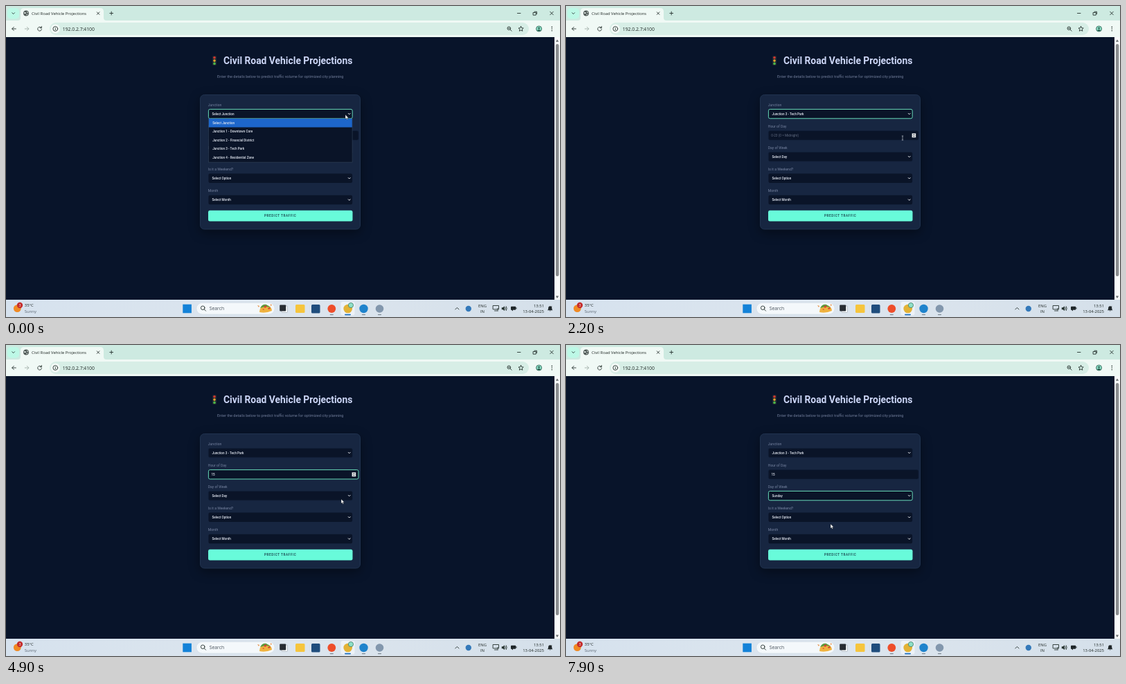
These frames come from a looping animation (800x450 px, 8000 ms). An HTML page:

```html
<!DOCTYPE html>
<html lang="en">
<head>
<meta charset="utf-8">
<title>Traffic form</title>
<style>
html, body { margin: 0; width: 100%; height: 100%; overflow: hidden; background: #08142a; }
svg { display: block; width: 100vw; height: 100vh; }
text { font-family: Roboto, "Open Sans", sans-serif; white-space: pre; }
.ui text { font-family: "Open Sans", "Noto Sans", sans-serif; fill: #1d2623; }
.line { fill: none; stroke: #26332f; stroke-width: .9; stroke-linecap: round; stroke-linejoin: round; }
.label { font-size: 5.05px; fill: #7784a1; }
.value { font-size: 4.6px; fill: #e3e8f2; font-weight: 500; }
.hint { font-size: 4.75px; fill: #616b80; }
.card { filter: drop-shadow(0 5px 8px rgba(0, 0, 0, .38)); }
</style>
</head>
<body>
<svg id="stage" viewBox="0 0 800 450">
  <defs>
    <linearGradient id="bar"><stop offset="0" stop-color="#d6e2ee"/><stop offset=".5" stop-color="#dce5ee"/><stop offset="1" stop-color="#d5e0ea"/></linearGradient>
  </defs>
  <rect width="800" height="450" fill="#08142a"/>

  <!-- browser chrome -->
  <g class="ui">
    <rect width="800" height="45" fill="#cdeae1"/>
    <rect x="2" y="3" width="17" height="15.5" rx="5" fill="#bdf8e6"/>
    <path class="line" d="M8.8 9.8l1.8 1.8 1.8-1.8"/>
    <path d="M17 21q4 0 4-4V8q0-5 5-5H136q5 0 5 5v9q0 4 4 4H800V45H0V21Z" fill="#f0f9f5"/>
    <circle cx="29" cy="10.5" r="3.9" fill="#4d5754"/>
    <path d="M26.5 8.5l2.3 1-.8 2-1.6-.6zM30 7.6l2 1.6-1.4 1zM29.4 11.4l2 .4-1.6 2z" fill="#e9f3ef"/>
    <text x="37" y="12.8" font-size="5.85">Civil Road Vehicle Projections</text>
    <path class="line" d="M131.3 8.8l3.6 3.6m0-3.6l-3.6 3.6M149.8 10.5h4.8m-2.4-2.4v4.8"/>
    <path class="line" d="M738.5 10.5h4.5M761.5 9.5h3.7v3.7h-3.7zM763 8.2h3.5v3.5M785.7 8.2l4.6 4.6m0-4.6l-4.6 4.6" stroke-width=".7"/>
    <path class="line" d="M14.3 33H8.8m2.5-2.6L8.7 33l2.6 2.6"/>
    <path class="line" d="M27.3 33h5.5m-2.5-2.6l2.6 2.6-2.6 2.6" style="stroke:#a3afaa"/>
    <path class="line" d="M51 31.5a2.9 2.9 0 1 0 .5 2.2M51.4 29.6v2.2h-2.2"/>
    <rect x="63" y="24" width="692" height="18" rx="9" fill="#d7eee6"/>
    <circle cx="71.3" cy="33" r="6.6" fill="#f3faf7"/>
    <circle class="line" cx="71.3" cy="33" r="3.4" stroke-width=".8"/>
    <path class="line" d="M71.3 32.8v1.8M71.3 31.3v.1"/>
    <text x="81.8" y="35.6" font-size="6.8">192.0.2.7:4100</text>
    <circle class="line" cx="726.3" cy="32.3" r="2.3"/>
    <path class="line" d="M728.1 34.1l2.1 2.1M725.3 32.3h2"/>
    <path id="star" class="line"/>
    <circle cx="769.6" cy="33" r="4" fill="#8ddfc7" stroke="#27594b" stroke-width=".8"/>
    <circle cx="769.6" cy="32" r="1.3" fill="#27594b"/>
    <path d="M767.2 35.4q2.4-2.6 4.8 0-2.4 1.8-4.8 0z" fill="#27594b"/>
    <path class="line" d="M788.3 30.3v.1m0 2.6v.1m0 2.6v.1" style="stroke-width:1.5"/>
  </g>

  <!-- page scrollbar -->
  <rect x="792" y="45" width="8" height="380" fill="#f9fafa"/>
  <rect x="793.8" y="55" width="4.6" height="336" rx="2.3" fill="#8b8d8f"/>
  <path d="M793.8 51.8l2.2-3.4 2.2 3.4zM793.8 419.6l2.2 3.4 2.2-3.4z" fill="#6d7073"/>

  <!-- page -->
  <rect x="298" y="72" width="6" height="14" rx="1.6" fill="#202832"/>
  <circle cx="301" cy="74.7" r="1.8" fill="#d5382f"/>
  <circle cx="301" cy="79.1" r="1.8" fill="#e5a52c"/>
  <circle cx="301" cy="83.4" r="1.8" fill="#4cb84a"/>
  <text x="314" y="84" font-size="13.85" font-weight="700" fill="#ccd6f6">Civil Road Vehicle Projections</text>
  <text x="396.2" y="103.6" font-size="5.55" fill="#717d9a" text-anchor="middle">Enter the details below to predict traffic volume for optimized city planning</text>
  <rect class="card" x="280.5" y="128.5" width="231" height="194.5" rx="6" fill="#172641" stroke="#20334f"/>
  <g id="form"></g>
  <rect x="292" y="295.8" width="208.5" height="15.6" rx="2.5" fill="#68fbda"/>
  <text x="373" y="305.3" font-size="4.6" font-weight="500" letter-spacing=".6" fill="#153a45">PREDICT TRAFFIC</text>
  <g id="menus"></g>

  <!-- taskbar -->
  <g class="ui">
    <rect y="425" width="800" height="25" fill="url(#bar)"/>
    <circle cx="16.3" cy="437.6" r="5.4" fill="#f08a24"/>
    <circle cx="20" cy="433" r="4.2" fill="#c42b2b"/>
    <text x="20" y="435" font-size="5.4" text-anchor="middle" style="fill:#fff">3</text>
    <text x="26.8" y="435.3" font-size="5.9">35°C</text>
    <text x="26.8" y="443.8" font-size="5.9" style="fill:#596470">Sunny</text>
    <rect x="255.3" y="431.7" width="12.6" height="12.6" fill="#1382d8"/>
    <rect x="275" y="429.5" width="113" height="16.5" rx="8.2" fill="#f4f8fb" stroke="#cfd9e2" stroke-width=".5"/>
    <circle class="line" cx="284.2" cy="436.8" r="2.8"/>
    <path class="line" d="M286.3 438.9l2.2 2.3"/>
    <text x="293.8" y="440" font-size="6.75" style="fill:#47515b">Search</text>
    <path d="M366 443q0-9 9-10 8 0 9 8-9 4-18 2z" fill="#efb23f"/>
    <path d="M367 437q3-6 9-5l6 4-7-1z" fill="#5c9e3f"/>
    <path d="M372 435l3-2 2 2-3 2zM378 437l3-1 1 2-3 1zM370 439l2-1 1 2z" fill="#d34832"/>
    <path d="M363 433l3 1-1 2zM382 431l2 2-2 1z" fill="#e78f45"/>
    <rect x="398" y="434" width="8.5" height="9.5" rx="1" fill="#f7f9fb" stroke="#8b96a0" stroke-width=".5"/>
    <rect x="395.2" y="432.5" width="9" height="9" rx="1" fill="#272c32"/>
    <rect x="418" y="432" width="13.5" height="12" rx="1.5" fill="#f6c53d"/>
    <rect x="441" y="432" width="12.5" height="12.5" rx="1.5" fill="#1f4d7d"/>
    <circle cx="470.3" cy="438" r="5.9" fill="#ee4e2b"/>
    <rect x="483.5" y="428" width="20" height="19.5" rx="3" fill="#edf2f7"/>
    <circle cx="493.7" cy="438" r="6.3" fill="#e3b336"/>
    <circle cx="498" cy="433" r="3.6" fill="#8ddfc7" stroke="#32705f" stroke-width=".7"/>
    <circle cx="516.5" cy="438" r="6.2" fill="#1f83cc"/>
    <circle cx="539.5" cy="438" r="5.8" fill="#8297ad"/>
    <rect x="489" y="445.8" width="9" height="1.6" rx=".8" fill="#1d6fbd"/>
    <path d="M468.3 446.6h4M514.5 446.6h4M537.5 446.6h4" stroke="#7b8791" stroke-width="1.3" stroke-linecap="round"/>
    <path class="line" d="M648.8 439l2.6-2.6 2.6 2.6"/>
    <circle cx="667.8" cy="438" r="4.2" fill="#3479ba"/>
    <text x="688" y="436" font-size="5.9" text-anchor="middle">ENG</text>
    <text x="688" y="443.8" font-size="5.9" text-anchor="middle">IN</text>
    <path class="line" d="M703.5 433.5h8v5.4h-8zM705.5 441h3.5M710 437.5v4"/>
    <path d="M715.8 436.2h1.8l2.2-2v7l-2.2-2h-1.8z" fill="#26332f"/>
    <path class="line" d="M721 436q1.1 1.7 0 3.4M722.3 434.7q2 3 0 6" stroke-width=".7"/>
    <rect x="729" y="434.8" width="7.2" height="5" rx="1" fill="#1e2528"/>
    <path d="M736.4 436.2h1v2.2h-1zM729 439l3-1.5v4z" fill="#1e2528"/>
    <text x="777" y="435.8" font-size="5.9" text-anchor="end">13:51</text>
    <text x="777" y="444" font-size="5.9" text-anchor="end">13-04-2025</text>
    <path d="M782 440.2q1.2-1 1.2-3.4 0-2.6 2.5-2.6t2.5 2.6q0 2.4 1.2 3.4zM784.6 440.8h2.2q-1.1 1.6-2.2 0z" fill="#1e2528"/>
    <text x="786.7" y="436.2" font-size="4">z</text>
  </g>

  <path id="arrow" d="M0 0V6.3L1.5 5 2.5 7.2 3.5 6.7 2.6 4.6H4.6Z" fill="#fff" stroke="#10151d" stroke-width=".4"/>
  <path id="beam" d="M-1.2-3H1.2M0-3V3M-1.2 3H1.2" fill="none" stroke="#d5dae2" stroke-width=".6"/>
</svg>
<script>
const LOOP = 8000, ROW = 12.5;
const PICK_JUNCTION = 1600, FOCUS_HOUR = 2700, TYPE_ONE = 3750, TYPE_FIVE = 4100,
      OPEN_DAY = 5200, PICK_DAY = 7350;

// time, x, y of the pointer
const PATH = [
  [0, 490, 157.3], [200, 490, 157.3], [900, 470.5, 205], [1500, 470.5, 205],
  [2100, 486, 191], [2600, 486, 191], [2900, 486, 189], [4300, 486, 189],
  [4800, 484, 223], [5300, 484, 223], [6500, 396, 300.6], [6850, 396, 300.6],
  [7100, 394, 316], [7400, 394, 316], [7800, 382, 259], [LOOP, 382, 259]
];

const $ = id => document.getElementById(id);

function add(parent, tag, attrs, text) {
  const el = document.createElementNS("http://www.w3.org/2000/svg", tag);
  for (const key in attrs) el.setAttribute(key, attrs[key]);
  if (text) el.textContent = text;
  parent.appendChild(el);
  return el;
}

function show(el, on) { el.style.display = on ? "" : "none"; }

function setText(el, text) { if (el.textContent !== text) el.textContent = text; }

function makeField(label, y, value, isNumber) {
  const form = $("form");
  add(form, "text", { class: "label", x: 291.8, y: y - 11.3 }, label);
  const box = add(form, "rect", {
    x: 292.4, y: y - 6.6, width: isNumber ? 216.6 : 207.8, height: 13.4, rx: 2.2, fill: "#0a1428"
  });
  const text = add(form, "text", { class: "value", x: isNumber ? 296.4 : 297.6, y: y + 1.7 }, value);
  if (!isNumber) add(form, "path", {
    d: `M494 ${y - .9}l1.7 1.7 1.7-1.7`, fill: "none", stroke: "#eef1f5", "stroke-width": 1
  });
  return { box, text };
}

function makeMenu(top, items) {
  const g = add($("menus"), "g", {});
  add(g, "rect", {
    x: 292.5, y: top, width: 207.6, height: items.length * ROW + .6,
    fill: "#0a1428", stroke: "#34455a", "stroke-width": .6
  });
  const bar = add(g, "rect", { x: 292.8, width: 207, height: ROW, fill: "#1d66cb" });
  items.forEach((item, i) => add(g, "text", {
    class: "value", x: 298.2, y: top + i * ROW + 7.9
  }, item));
  return (open, y) => {
    show(g, open);
    const i = Math.floor((y - top) / ROW);
    bar.setAttribute("y", top + Math.max(0, Math.min(items.length - 1, i)) * ROW);
  };
}

const junction = makeField("Junction", 156, "Select Junction");
const hour = makeField("Hour of Day", 187.2, "", true);
const day = makeField("Day of Week", 218, "Select Day");
makeField("Is it a Weekend?", 249.2, "Select Option");
makeField("Month", 280.4, "Select Month");

const hint = add($("form"), "text", { class: "hint", x: 296.2, y: 188.8 }, "0-23 (0 = Midnight)");
const caret = add($("form"), "rect", { y: 184.5, width: .6, height: 5.4, fill: "#e3e8f2" });
const spinner = add($("form"), "g", {});
add(spinner, "rect", { x: 499.6, y: 184.3, width: 5.6, height: 6, fill: "#e8eaec" });
add(spinner, "path", { d: "M501 186.7l1.4-1.6 1.4 1.6zM501 187.9l1.4 1.6 1.4-1.6z", fill: "#454b52" });

const junctionMenu = makeMenu(163, ["Select Junction", "Junction 1 - Downtown Core",
  "Junction 2 - Financial District", "Junction 3 - Tech Park", "Junction 4 - Residential Zone"]);
const dayMenu = makeMenu(225, ["Select Day", "Monday", "Tuesday", "Wednesday", "Thursday",
  "Friday", "Saturday", "Sunday"]);

$("star").setAttribute("d", "M" + Array.from({ length: 10 }, (_, i) => {
  const a = i * Math.PI / 5, r = i % 2 ? 1.8 : 3.8;
  return (743.6 + r * Math.sin(a)).toFixed(2) + " " + (33.2 - r * Math.cos(a)).toFixed(2);
}).join("L") + "Z");

function pointerAt(t) {
  const i = PATH.findIndex(p => p[0] > t);
  const [t0, x0, y0] = PATH[i - 1], [t1, x1, y1] = PATH[i];
  const u = (t - t0) / (t1 - t0), k = u * u * (3 - 2 * u);
  return [x0 + (x1 - x0) * k, y0 + (y1 - y0) * k];
}

function focusRing(field, on) {
  field.box.setAttribute("stroke", on ? "#67d9b8" : "#12213a");
  field.box.setAttribute("stroke-width", on ? 1 : .6);
}

function draw(t) {
  const [x, y] = pointerAt(t);
  const inHour = t >= FOCUS_HOUR && t < OPEN_DAY;
  const overHour = t > PICK_JUNCTION && t < OPEN_DAY && y > 180.5 && y < 194;

  focusRing(junction, t < FOCUS_HOUR);
  focusRing(hour, inHour);
  focusRing(day, t >= OPEN_DAY);

  setText(junction.text, t < PICK_JUNCTION ? "Select Junction" : "Junction 3 - Tech Park");
  setText(hour.text, t < TYPE_ONE ? "" : t < TYPE_FIVE ? "1" : "15");
  setText(day.text, t < PICK_DAY ? "Select Day" : "Sunday");
  show(hint, t < TYPE_ONE);
  show(spinner, inHour || overHour);

  const since = t - (t < TYPE_ONE ? FOCUS_HOUR : t < TYPE_FIVE ? TYPE_ONE : TYPE_FIVE);
  show(caret, inHour && since % 1000 < 500);
  caret.setAttribute("x", t < TYPE_ONE ? 296.3 : t < TYPE_FIVE ? 299 : 301.7);

  junctionMenu(t < PICK_JUNCTION, y);
  dayMenu(t >= OPEN_DAY && t < PICK_DAY, y);

  for (const id of ["arrow", "beam"]) {
    $(id).setAttribute("transform", `translate(${x.toFixed(2)} ${y.toFixed(2)})`);
    show($(id), (id === "beam") === overHour);
  }
}

const start = performance.now();
function tick() {
  draw((performance.now() - start) % LOOP);
  requestAnimationFrame(tick);
}
tick();
</script>
</body>
</html>
```
